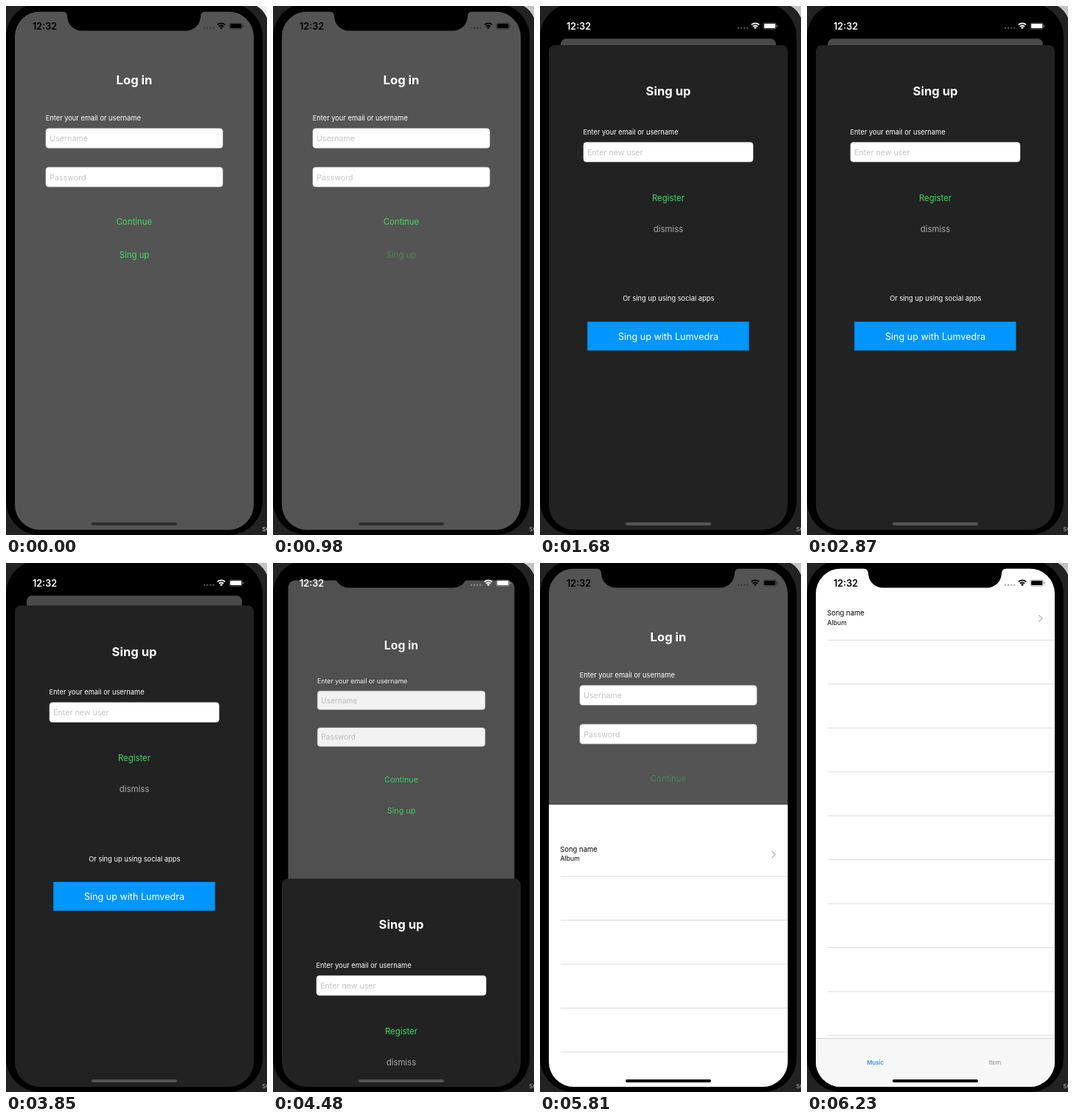
Animation, 354 px wide and 716 px high, one loop 8000 ms. Source, as an HTML page:

```html
<!DOCTYPE html>
<html lang="en">
<head>
<meta charset="utf-8">
<title>Log in flow</title>
<style>
  html, body { margin: 0; width: 100%; height: 100%; overflow: hidden; background: #000; }
  svg { display: block; width: 354px; height: 716px; }
  text { font-family: Inter, "Open Sans", sans-serif; font-size: 11.4px; fill: #fff; }
  .mid { text-anchor: middle; }
  .title { font-size: 16.6px; font-weight: 700; }
  .label { font-size: 9.3px; }
  .hint { font-size: 10.65px; fill: #c4c4c6; }
  .field { fill: #fff; stroke: #dedede; stroke-width: .5; }
  .green { fill: #45d86a; }
  .grey { fill: #a9a9a9; }
  .tab { font-size: 7.9px; font-weight: 500; }
  #music text { fill: #000; }
  #music .active { fill: #1a86f0; }
  #music .idle { fill: #999; }
  #status text { font-size: 12.6px; font-weight: 600; fill: currentColor; }
</style>
</head>
<body>
<svg viewBox="0 0 354 716">
  <defs>
    <clipPath id="screen"><rect x="12" y="7.5" width="324" height="701.5" rx="34"/></clipPath>
  </defs>

  <!-- phone body and the desktop behind it -->
  <rect width="354" height="716" fill="#222"/>
  <path id="desktop" d="M340 0Q349 5 354 16V0Z"/>
  <rect x="0" y="-4" width="348" height="720" rx="46"/>
  <text id="behind" x="347.3" y="711" style="font-size:10px">se</text>

  <g clip-path="url(#screen)">
    <g id="login">
      <rect class="card" x="12" y="7.5" width="324" height="702" fill="#545454"/>
      <text class="mid title" x="174" y="106">Log in</text>
      <text class="label" x="53.7" y="155.1">Enter your email or username</text>
      <rect class="field" x="54" y="165.7" width="240" height="26.6" rx="4"/>
      <text class="hint" x="59.3" y="183">Username</text>
      <rect class="field" x="54" y="218.2" width="240" height="26.6" rx="4"/>
      <text class="hint" x="59.3" y="235.5">Password</text>
      <text id="continue" class="mid green" x="174" y="296.2">Continue</text>
      <text id="signup" class="mid green" x="174" y="340.8">Sing up</text>
      <rect id="dim" class="card" x="12" y="7.5" width="324" height="702"/>
    </g>

    <g id="sheet">
      <rect x="12" width="324" height="760" rx="8" fill="#222"/>
      <text class="mid title" x="174" y="68.3">Sing up</text>
      <text class="label" x="58.5" y="121">Enter your email or username</text>
      <rect class="field" x="59" y="131.4" width="230" height="26.6" rx="4"/>
      <text class="hint" x="64.2" y="148.7">Enter new user</text>
      <text class="mid green" x="174" y="211.1">Register</text>
      <text class="mid grey" x="174" y="252.5">dismiss</text>
      <text class="mid label" x="174.3" y="346.2">Or sing up using social apps</text>
      <rect x="64.3" y="374.3" width="219.2" height="39" fill="#0096ff"/>
      <text class="mid" x="174" y="398.5" style="font-size:12.6px">Sing up with Lumvedra</text>
    </g>

    <g id="music">
      <rect x="12" y="7.5" width="324" height="702" fill="#fff"/>
      <text x="27.2" y="71.4" style="font-size:9.5px">Song name</text>
      <text x="27.6" y="83.7" style="font-size:8.7px">Album</text>
      <path d="M314.4 70.4l4.6 4.6-4.6 4.6" fill="none" stroke="#bcbcc0" stroke-width="1.4"/>
      <path id="rows" stroke="#dcdcdc"/>
      <rect x="12" y="643.5" width="324" height="66" fill="#f7f7f7"/>
      <path d="M12 643.5H336" stroke="#d2d2d2"/>
      <text class="mid tab active" x="92.7" y="679.4">Music</text>
      <text class="mid tab idle" x="255" y="679.4">Item</text>
    </g>

    <rect id="home" x="116" y="699" width="116" height="4" rx="2"/>
  </g>

  <path d="M77 7.5a6 6 0 0 1 6 6a20 20 0 0 0 20 20H244a20 20 0 0 0 20-20a6 6 0 0 1 6-6V0H77Z"/>

  <g id="status" fill="currentColor">
    <text x="36" y="31.6">12:32</text>
    <path d="M269 29.7h13" stroke="currentColor" stroke-width="2.5" stroke-linecap="round" stroke-dasharray="0 4.1" opacity=".32"/>
    <path d="M286.8 25.4a7.8 7.8 0 0 1 10.4 0M288.9 27.8a4.7 4.7 0 0 1 6.2 0" fill="none" stroke="currentColor" stroke-width="1.9"/>
    <path d="M292 31.3l-1.9-2.1a2.8 2.8 0 0 1 3.8 0Z"/>
    <rect x="303" y="23" width="17.4" height="8.2" rx="2.3" fill="none" stroke="currentColor" stroke-width=".9" opacity=".4"/>
    <rect x="304.1" y="24.1" width="15.2" height="6" rx="1.3"/>
    <rect x="321.3" y="25.7" width="1.2" height="2.9" rx=".6" opacity=".4"/>
  </g>
</svg>

<script>
  const LOOP = 8000, TICK = 70;
  const TOP = 7.5, BOTTOM = 709, SHEET_TOP = 53;
  const el = id => document.getElementById(id);
  const ramp = (t, from, to) => Math.min(1, Math.max(0, (t - from) / (to - from)));
  const settle = p => p > .9965 ? 1 : p;

  // Critically damped spring, 0 to 1
  function spring(t, start, rate) {
    const x = Math.max(0, t - start) * rate;
    return settle(1 - (1 + x) * Math.exp(-x));
  }

  // Same, with a softer start, for the flick that throws the sheet away
  function softSpring(t, start, rate) {
    const x = Math.max(0, t - start) * rate;
    return settle(1 - (1 + x + x * x / 2) * Math.exp(-x));
  }

  el('rows').setAttribute('d',
    Array.from({ length: 10 }, (_, i) => `M28 ${104.4 + i * 59.45}H336`).join(''));

  // The card regains its size a little later than its place
  function drawLogin(rise, fall) {
    const back = rise * (1 - fall);
    const scale = 1 - .099 * rise * Math.pow(1 - fall, .75);
    el('login').setAttribute('transform',
      `translate(174 ${TOP + 36.8 * back}) scale(${scale}) translate(-174 ${-TOP})`);
    document.querySelectorAll('.card').forEach(c => c.setAttribute('rx', 12 - 4 * back));
    el('dim').setAttribute('opacity', .12 * back);
  }

  function draw(t) {
    const rise = t < 1120 ? 0 : spring(t, 1085, .014);
    const fall = t < 4270 ? 0 : t >= 4900 ? 1 : softSpring(t, 4255, .01315);
    const cover = t < 5740 ? 0 : t >= 6230 ? 1 : spring(t, 5690, .0152);

    drawLogin(rise, fall);

    const drag = t < 3780 ? 0 : t < 3850 ? 2 : 4.4;
    const rest = SHEET_TOP + drag;
    const shift = (1 - rise) * (BOTTOM - SHEET_TOP) + fall * (BOTTOM - rest);
    el('sheet').setAttribute('transform', `translate(0 ${rest + shift})`);
    el('music').setAttribute('transform', `translate(0 ${(1 - cover) * (BOTTOM - TOP)})`);

    el('signup').setAttribute('opacity', t >= 980 && t < 1260 ? .35 : 1);
    el('continue').setAttribute('opacity', t >= 5600 ? .35 : 1);

    const light = Math.round(255 * (ramp(t, 1190, 1440) - ramp(t, 4500, 4780)));
    el('status').style.color = `rgb(${light},${light},${light})`;

    const sheetUp = t >= 1120 && t < 4900;
    el('home').setAttribute('fill', cover ? '#000' : sheetUp ? '#555' : '#2e2e2e');
    el('desktop').setAttribute('fill', t < 140 ? '#f0f0f0' : '#c4c4c4');
    el('behind').style.fill = t < 140 ? '#d0d0d0' : '#a8a8a8';
  }

  const begin = performance.now();
  function frame() {
    const t = (performance.now() - begin) % LOOP;
    draw(Math.floor(t / TICK) * TICK);
    requestAnimationFrame(frame);
  }
  frame();
</script>
</body>
</html>
```
